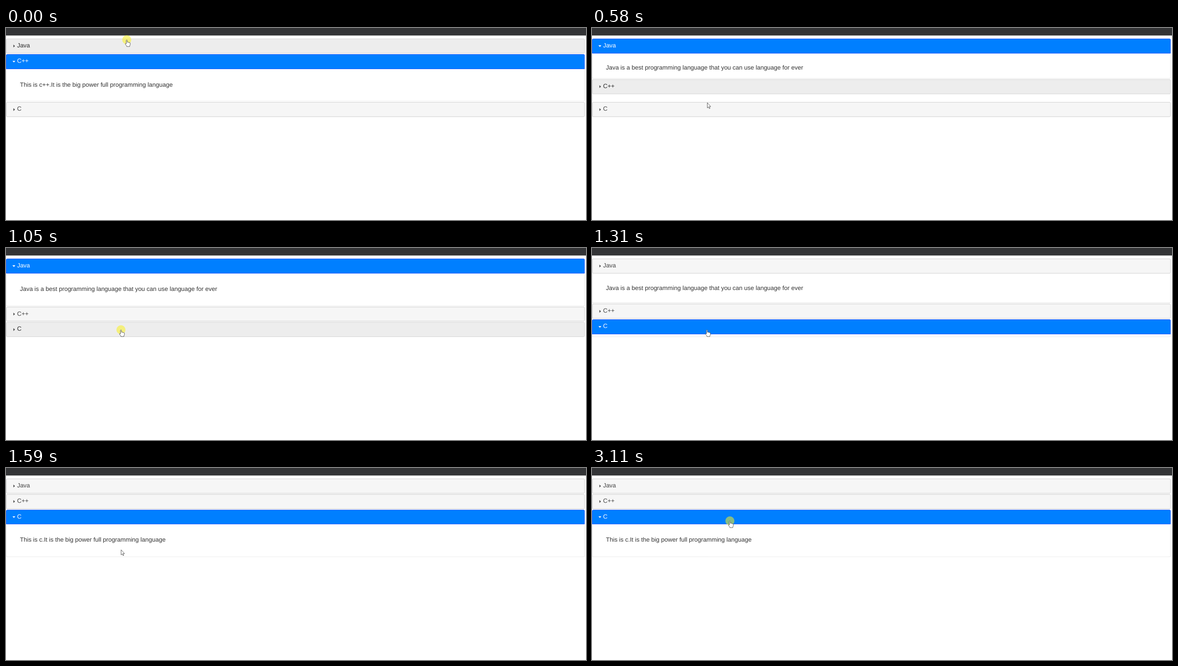
An HTML page that plays this animation: 1280 by 425 pixels, repeating every 3240 ms.

```html
<!DOCTYPE html>
<html lang="en">
<head>
<meta charset="utf-8">
<title>Accordion</title>
<style>
  html, body { margin: 0; width: 100%; height: 100%; overflow: hidden; background: #fff; }
  body { position: relative; }
  #list { position: absolute; left: 0; top: 0; width: 1520px; transform-origin: 0 0; transform: translate(.3px, 23.6px) scale(.8406);
    font: 16px/20.8px "Liberation Sans", Arial, sans-serif; text-rendering: geometricPrecision; }
  .head, .panel { position: absolute; left: 0; width: 1519px; box-sizing: border-box; white-space: nowrap; }
  .head { height: 38.8px; border: 1px solid #c5c5c5; border-radius: 3px; background: #f6f6f6; color: #454545; }
  .head.hover { background: #ededed; border-color: #ccc; color: #2b2b2b; }
  .head.active { background: #007fff; border-color: #003eff; color: #fff; border-radius: 3px 3px 0 0; }
  .head span { position: absolute; left: 27.7px; top: 8px; }
  .head i { position: absolute; left: 17.8px; top: 14.4px; width: 4.5px; height: 8px; background: #484848; clip-path: polygon(0 0, 100% 50%, 0 100%); }
  .head.active i { left: 15.4px; top: 16.3px; width: 8px; height: 4.5px; background: #fff; clip-path: polygon(0 0, 100% 0, 50% 100%); }
  .panel { border: solid #ddd; border-width: 0 1px 1px; border-radius: 0 0 3px 3px; overflow: hidden; color: #333; }
  .panel span { position: absolute; left: 35.2px; }
  svg { position: absolute; left: 0; top: 0; }
</style>
</head>
<body>
<div id="list"></div>
<svg width="1280" height="425">
  <rect width="1280" height="16.6" fill="#333436"/>
  <g id="cursor">
    <circle id="click" r="10" fill="#faf01e" fill-opacity=".54"/>
    <path id="shape" stroke="#333" stroke-width=".8" stroke-linejoin="round"/>
  </g>
</svg>
<script>
const LOOP = 3240, HEAD = 38.8, GAP = 2, PANEL = 85.8, PAD = 16;

const items = [
  ["Java", "Java is a best programming language that you can use language for ever"],
  ["C++", "This is c++.It is the big power full programming language"],
  ["C", "This is c.It is the big power full programming language"]
];

const shapes = {
  hand: "M-1.1 9V1Q0-.8 1.1 1V5.4Q2.4 4.4 3.3 5.8 4.6 5 5.5 6.4 7.3 5.8 7.6 7.8V10.5Q7.4 12 6.5 13.2V15H-.2V13.7L-3.3 9.8Q-3.3 7.6-1.1 9Z",
  arrow: "M0 0V11.5L2.6 9.1 4.3 13 6 12.3 4.3 8.5H7.6Z",
  beam: "M-2.8-5.5H-.5L0-5 .5-5.5H2.8M0-5V5M-2.8 5.5H-.5L0 5 .5 5.5H2.8"
};

// Pointer track: time, x, y, shape
const track = [
  [0, 266.5, 26, "hand"], [230, 266.5, 26, "hand"], [580, 254.5, 165.5, "arrow"],
  [720, 254, 176, "arrow"], [780, 253.8, 179, "hand"], [850, 253.7, 181, "hand"],
  [1310, 253.7, 181, "hand"], [1380, 254.5, 181.5, "arrow"], [1450, 255, 182, "beam"],
  [1520, 254, 181, "arrow"], [1590, 254, 181, "arrow"], [1990, 257, 169, "arrow"],
  [2140, 260, 163, "beam"], [2270, 264, 157.5, "beam"], [2338, 270, 147, "arrow"],
  [2474, 286, 115, "hand"], [2610, 293, 94, "hand"], [2890, 304.3, 117, "hand"],
  [LOOP, 304.3, 117, "hand"]
];

// The screen refreshes only in these bursts: start, end, interval
const bursts = [
  [0, 0, 70], [230, 720, 70], [780, 850, 70], [1050, 1050, 70], [1310, 1590, 70],
  [1990, 1990, 70], [2140, 2140, 70], [2270, 2610, 68], [2680, 2890, 70], [3110, 3110, 70]
];

const $ = id => document.getElementById(id);
const within = (t, a, b) => t >= a && t < b;

function add(cls, text) {
  const el = document.createElement("div"), span = document.createElement("span");
  el.className = cls;
  span.textContent = text;
  el.append(span);
  $("list").append(el);
  return el;
}

const rows = items.map(([title, text]) => {
  const head = add("head", title);
  head.append(document.createElement("i"));
  return { head, panel: add("panel", text) };
});

function refresh(t) {
  const [start, end, step] = bursts.findLast(b => b[0] <= t);
  return Math.min(end, start + step * Math.floor((t - start) / step));
}

function swing(t, start, length) {
  const x = Math.min(1, Math.max(0, (t - start) / length));
  return (1 - Math.cos(Math.PI * x)) / 2;
}

function drawRows(t) {
  const a = swing(t, 187, 577), b = swing(t, 1250, 320);
  const open = [a - b, 1 - a, b];
  const active = t < 230 ? 1 : t < 1310 ? 0 : 2;
  const hover = t < 230 ? 0 : within(t, 510, 650) ? 1 : within(t, 780, 1310) ? 2 : -1;
  let y = 0;
  rows.forEach(({ head, panel }, i) => {
    const part = open[i], height = PANEL * part;
    head.className = "head" + (i === active ? " active" : i === hover ? " hover" : "");
    head.style.top = y + "px";
    y += HEAD;
    panel.style.display = height < .5 ? "none" : "block";
    panel.style.top = y + "px";
    panel.style.height = height + "px";
    panel.style.borderBottomWidth = i === active || part > .9 ? "1px" : "0";
    panel.firstChild.style.top = PAD + PAD * part + "px";
    y += height + GAP;
  });
}

function drawCursor(t) {
  const n = track.findLastIndex(k => k[0] <= t);
  const [t0, x0, y0, shape] = track[n], [t1, x1, y1] = track[n + 1];
  const u = (t - t0) / (t1 - t0);
  $("cursor").setAttribute("transform", `translate(${x0 + (x1 - x0) * u} ${y0 + (y1 - y0) * u})`);
  $("shape").setAttribute("d", shapes[shape]);
  $("shape").setAttribute("fill", shape === "beam" ? "none" : "#fff");
  $("click").style.display = [0, 1050, 3110].includes(t) ? "" : "none";
}

let begin;
function frame(now) {
  begin ??= now;
  const t = refresh((now - begin) % LOOP);
  drawRows(t);
  drawCursor(t);
  requestAnimationFrame(frame);
}
requestAnimationFrame(frame);
</script>
</body>
</html>
```
